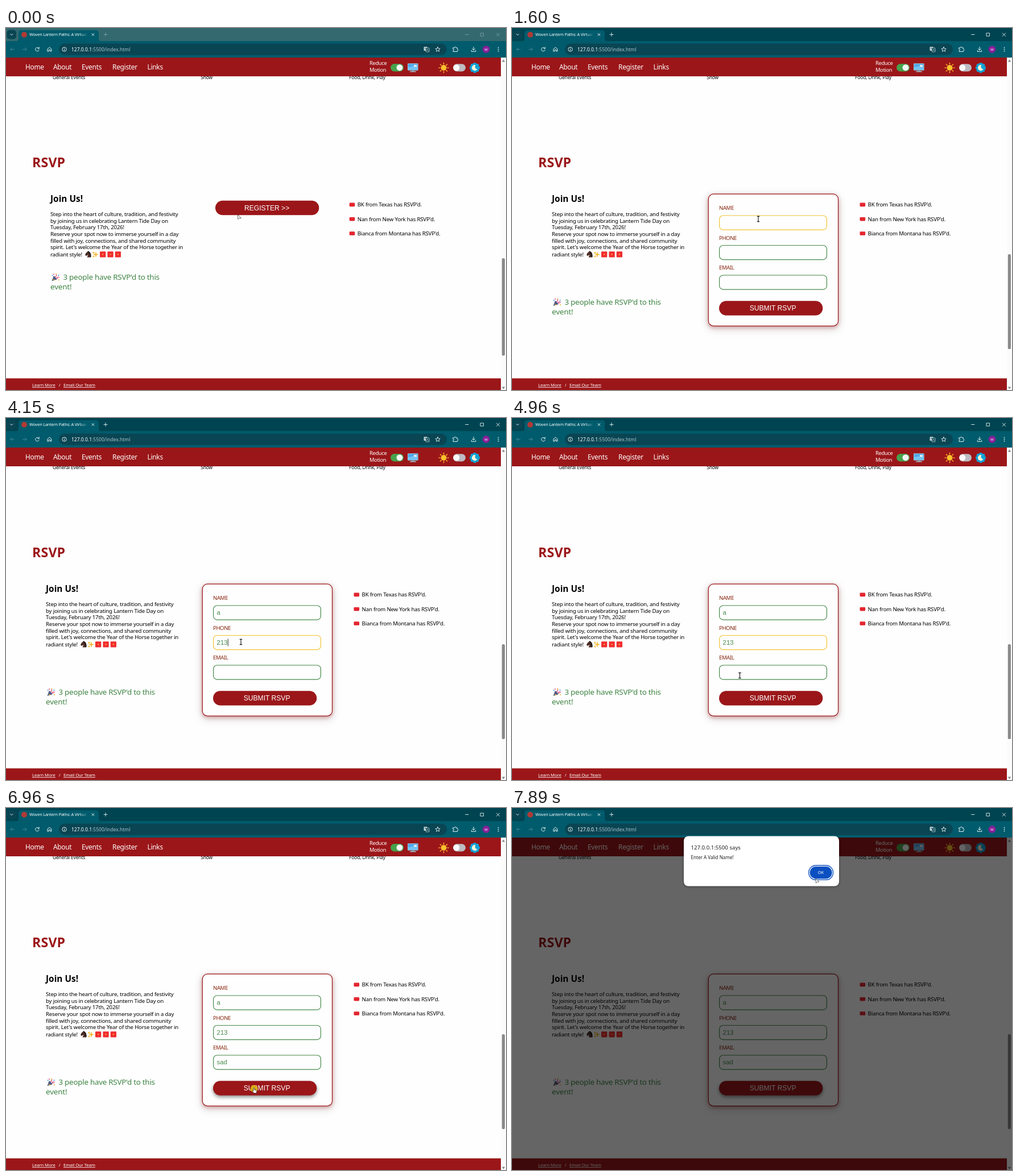
An HTML page that plays this animation: 879 px wide and 637 px high, repeating every 8000 ms.

```html
<!DOCTYPE html>
<html lang="en">
<head>
<meta charset="utf-8">
<title>RSVP form</title>
<style>
html, body { margin: 0; width: 100%; height: 100%; overflow: hidden; background: #fefefe; }
svg { display: block; width: 100%; height: 100%; }
text { font-family: "Noto Sans", "Open Sans", sans-serif; white-space: pre; }
.arial { font-family: "Liberation Sans", Arial, sans-serif; }
.card { filter: drop-shadow(0 2px 3px rgba(155, 22, 25, .32)) drop-shadow(0 4px 7px rgba(60, 10, 10, .2)); }
.hover { filter: drop-shadow(0 3px 3px rgba(0, 0, 0, .45)); }
</style>
</head>
<body>
<svg id="stage" viewBox="0 0 879 637" preserveAspectRatio="none"></svg>
<script>
const LOOP = 8000;
const RED = '#9b1619', GREEN = '#478a4b', GOLD = '#f2c335', TEAL = '#005b6c', DARK = '#0a4553';

const text = (x, y, str, size, fill = '#000', extra = '') =>
  `<text x="${x}" y="${y}" font-size="${size}" fill="${fill}" ${extra}>${str}</text>`;
const gap = n => `letter-spacing="${n}"`;
const rect = (x, y, w, h, r, fill, extra = '') =>
  `<rect x="${x}" y="${y}" width="${w}" height="${h}" rx="${r}" fill="${fill}" ${extra}/>`;
const circle = (x, y, r, fill, extra = '') =>
  `<circle cx="${x}" cy="${y}" r="${r}" fill="${fill}" ${extra}/>`;
const path = (d, fill, extra = '') => `<path d="${d}" fill="${fill}" ${extra}/>`;
const line = (d, color = '#e4f2f4', w = 1) =>
  path(d, 'none', `stroke="${color}" stroke-width="${w}" stroke-linecap="round" stroke-linejoin="round"`);
const group = (id, body) => `<g id="${id}">${body}</g>`;
const ring = (n, fn) => Array.from({ length: n }, (_, i) => fn(i * 2 * Math.PI / n)).join('');
const star = (x, y, r) => path(
  `M${x} ${y - r}Q${x} ${y} ${x + r} ${y}Q${x} ${y} ${x} ${y + r}Q${x} ${y} ${x - r} ${y}Q${x} ${y} ${x} ${y - r}`, '#f5b92e',
  'stroke="#f5b92e" stroke-width=".7"');

function browser() {
  return rect(0, 0, 879, 24, 0, '#004451', 'id="strip"') + rect(0, 23, 879, 29, 0, TEAL) +
    path('M17 23.5Q22 23.5 22 18.5V9Q22 4 27 4H158Q163 4 163 9V18.5Q163 23.5 168 23.5Z', TEAL) +
    rect(1.5, 3.5, 16.5, 16, 5, DARK) + line('M7.7 10.6L9.8 12.7L11.9 10.6') +
    circle(32, 11.7, 5, '#b03a36') +
    text(41, 14.3, 'Woven Lantern Paths: A Virtual', 7.3, 'url(#fade)', 'font-weight="500" ' + gap(-.15)) +
    line('M151 9.7L154.8 13.5M154.8 9.7L151 13.5') +
    group('controls', line('M172 11.5H178M175 8.5V14.5M807.5 11.5H813M834.3 9H839.5V14.2H834.3ZM862.3 9L867.7 14.4M867.7 9L862.3 14.4', '#e4f2f4', .9)) +
    line('M14.5 37.5H8M10.8 34.6L7.9 37.5L10.8 40.4M29.5 37.5H36M33.2 34.6L36.1 37.5L33.2 40.4', '#3f8593') +
    line('M57.6 35.6A3.3 3.3 0 1 0 58.1 38.6M58.2 33.8V36.2H55.8M73.2 36.8L76.5 34L79.8 36.8V41H77.8V38.4H75.2V41H73.2Z') +
    rect(93, 27.5, 682, 20, 10, DARK) +
    circle(102.5, 37.5, 3.7, 'none', 'stroke="#e4f2f4"') + line('M102.5 37.2V39.3M102.5 35.6V35.7') +
    text(115, 40.6, '127.0.0.1<tspan fill="#a9c3c9">:5500/index.html</tspan>', 8.5, '#fff') +
    rect(734.5, 33, 6, 7, 1, '#bdd2d6') + rect(738, 35, 6, 7, 1, DARK, 'stroke="#bdd2d6" stroke-width=".8"') +
    line('M736 35.3H739M737.5 34.5V36.5', '#587c85', .7) + line('M739.5 40L741 37L742.5 40', '#bdd2d6', .7) +
    line('M759 33.4L760.2 36.2L763.2 36.4L760.9 38.4L761.6 41.3L759 39.7L756.4 41.3L757.1 38.4L754.8 36.4L757.8 36.2Z', '#e4f2f4', .9) +
    line('M786 34.8H788.3A1.5 1.5 0 0 1 791.3 34.8H793.3V37A1.5 1.5 0 0 1 793.3 40V41.5H786V39.6A1.4 1.4 0 0 0 786 36.8Z') +
    line('M822 33.3V38.8M819.6 36.6L822 39L824.4 36.6M818.3 39.4V41.4H825.7V39.4') +
    circle(844, 37.5, 6.3, '#8b1f9c') + text(844, 39.7, 'W', 6, '#fff', 'text-anchor="middle"') +
    [34.3, 37.5, 40.7].map(y => circle(865.5, y, .9, '#e4f2f4')).join('');
}

function navbar() {
  const links = [[34, 'Home'], [83, 'About'], [133, 'Events'], [187, 'Register'], [248.5, 'Links']];
  return rect(0, 52, 870, 33, 0, RED) +
    links.map(([x, s]) => text(x, 73.4, s, 11.9, '#fff', gap(-.27))).join('') +
    text(639, 65.2, 'Reduce', 9.4, '#fff', gap(-.35)) + text(639, 76.6, 'Motion', 9.4, '#fff', gap(-.4)) +
    rect(676, 63, 23, 13.4, 6.7, '#46a24c') + circle(692, 69.7, 5.5, '#f6f6f6') +
    rect(706, 62.3, 18.6, 12.4, 1.2, '#9fc3d6') + rect(707, 63.3, 16.6, 10.2, .5, '#4fa9ea') +
    path('M707 69L723.6 66V73.5H707Z', '#74c3f3') +
    rect(717, 65, 5, 3.2, .3, '#e9eef0') + rect(713, 74.7, 5, 1.6, 0, '#76909e') + rect(710, 76.1, 11, 1.5, .7, '#a9bcc6') +
    ring(8, a => line(`M${769.5 + 6.6 * Math.cos(a)} ${70 + 6.6 * Math.sin(a)}L${769.5 + 8.4 * Math.cos(a)} ${70 + 8.4 * Math.sin(a)}`, '#f5a623', 1.7)) +
    circle(769.5, 70, 5, '#fbc02d') +
    rect(786, 63.2, 22, 13.2, 6.6, '#bcbcc2') + circle(791.8, 69.8, 5.5, '#fafafa') +
    ring(8, a => circle(824 + 6 * Math.cos(a), 70 + 6 * Math.sin(a), 3.1, '#12a3d6')) + circle(824, 70, 7.2, '#12a3d6') +
    path('M825.5 65.2A5 5 0 1 0 828.6 72.3A4.2 4.2 0 0 1 825.5 65.2Z', '#fff6d8');
}

function intro() {
  const lines = ['Step into the heart of culture, tradition, and festivity',
    'by joining us in celebrating Lantern Tide Day on', 'Tuesday, February 17th, 2026!',
    'Reserve your spot now to immerse yourself in a day', 'filled with joy, connections, and shared community',
    "spirit. Let's welcome the Year of the Horse together in"];
  const packet = x => rect(x, 393.3, 10.3, 10.2, 1, '#f02c2f') + rect(x + 4, 397.3, 2.3, 2.3, .5, '#f8a13a');
  return text(70, 306, 'Join Us!', 15.3, '#000', 'font-weight="700" ' + gap(.05)) +
    lines.map((s, i) => text(70, 331 + i * 11.63, s, 9.65, '#000', gap(-.17))).join('') +
    text(70, 401.9, 'radiant style!', 9.65, '#000', gap(-.17)) +
    path('M132.5 396L136 393L139 394.5Q141.5 397 141 403.5H134.5L136.5 399L133 401L131 399.5Z', '#4a2b23') +
    line('M136.5 393.2Q141 395 140.8 402.5', '#191413', 1.6) +
    star(150, 398.6, 4.4) + star(146, 395.5, 1.8) + star(146, 402, 1.6) +
    [157, 170.4, 183.7].map(packet).join('');
}

function counter() {
  const bits = [[76, 477, '#e8467c'], [80, 476.5, '#f3b52f'], [84.5, 479, '#3b9ae0'], [82.5, 484, '#e8467c'], [85, 487, '#f3b52f'], [73.6, 479.2, '#3b9ae0']];
  return path('M72.5 489L76 479.5L82 486Z', '#4a5a86') + path('M74 485L79 487.2L76.5 488Z', '#f3b52f') +
    line('M78.5 481.5Q81 480 80.6 477.5M80.5 483.5Q83 481 85.5 482.5', '#d6406f', 1.1) +
    bits.map(([x, y, c]) => circle(x, y, 1, c)).join('') +
    text(92.5, 486.7, "3 people have RSVP'd to this", 13.4, '#3f8444', gap(-.26)) +
    text(70, 503.6, 'event!', 13.4, '#3f8444', gap(-.15));
}

function guests() {
  return ['BK from Texas', 'Nan from New York', 'Bianca from Montana'].map((who, i) => {
    const y = 314.2 + i * 25.3;
    return rect(611.5, y - 6.6, 9.6, 6.6, 1.4, '#e2222c') + line(`M612.5 ${y - 5.4}L616.3 ${y - 3.4}L620.1 ${y - 5.4}`, '#ec4450', .5) +
      text(625.6, y, `${who} has RSVP'd.`, 9.65, '#000', gap(-.2));
  }).join('');
}

const button = (id, x, y, label) => rect(x, y, 182.3, 25.4, 12.7, RED, `id="${id}"`) +
  text(458.6, y + 17.1, label, 12.1, '#fff', 'class="arial" text-anchor="middle"');

function form() {
  return rect(345.3, 292.2, 228.2, 232.2, 9, '#fefefe', `class="card" stroke="${RED}" stroke-width="1.2"`) +
    ['NAME', 'PHONE', 'EMAIL'].map((s, i) => {
      const y = 320.4 + i * 52.5;
      return text(364, y, s, 9.6, '#87260f', gap(-.4)) +
        rect(364.6, y + 9.6, 188.8, 25.1, 6.5, '#fefefe', `id="box${i}" stroke-width="1.2"`) +
        text(370.6, y + 25.8, '', 11.3, GREEN, `id="value${i}" class="arial"`);
    }).join('') +
    rect(371, 0, .9, 13, 0, '#222', 'id="caret"') + button('submit', 364, 480.3, 'SUBMIT RSVP');
}

function dialog() {
  return rect(302, 49.5, 273, 88, 8, '#fff', 'style="filter:drop-shadow(0 1px 2px rgba(0,0,0,.4))"') +
    text(314.5, 72.8, '127.0.0.1:5500 says', 9.65, '#1f1f1f') +
    text(314.5, 90, 'Enter A Valid Name!', 8.1, '#1f1f1f') +
    rect(521.6, 101, 43, 25.4, 12.7, '#fff', 'stroke="#0b4fc0" stroke-width="1.3"') +
    rect(523.6, 103, 39, 21.4, 10.7, '#0b4fc0') +
    text(543, 116.4, 'OK', 7.6, '#fff', 'text-anchor="middle"');
}

const outline = 'stroke="#222" stroke-width=".65" stroke-linejoin="round"';
const stage = document.getElementById('stage');
stage.innerHTML = `<defs><linearGradient id="fade" gradientUnits="userSpaceOnUse" x1="130" x2="143" y1="0" y2="0">
  <stop stop-color="#fff"/><stop offset="1" stop-color="#fff" stop-opacity="0"/></linearGradient></defs>` +
  rect(0, 52, 879, 585, 0, '#fefefe') +
  [[82, 'General Events'], [342.3, 'Show'], [603, 'Food, Drink, Play']].map(([x, s]) => text(x, 90.2, s, 8.47, '#000', gap(-.17))).join('') +
  text(46, 244.8, 'RSVP', 23.2, RED, 'font-weight="700" ' + gap(.15)) +
  group('intro', intro()) + group('counter', counter()) + group('guests', guests()) +
  group('closed', button('register', 368, 303.8, 'REGISTER &gt;&gt;')) + group('open', form()) +
  rect(870, 52, 9, 585, 0, '#fbfbfb') + rect(871.8, 0, 5.2, 0, 2.6, '#8a8a8a', 'id="thumb"') +
  path('M871.8 59.5L874.5 55.5L877.2 59.5ZM871.8 631.5L874.5 635.5L877.2 631.5Z', '#858585') +
  navbar() + rect(0, 616.5, 870, 21, 0, RED) +
  text(46, 631, '<tspan text-decoration="underline">Learn More</tspan>', 7.7, '#fff', gap(-.08)) +
  text(92.8, 631, '/', 7.7, '#fff') +
  text(101, 631, '<tspan text-decoration="underline">Email Our Team</tspan>', 7.7, '#fff', gap(-.1)) +
  rect(0, 52, 879, 585, 0, '#000', 'id="dim" opacity=".6"') +
  browser() + group('dialog', dialog()) +
  group('pointer',
    circle(0, 1.5, 6.5, '#dcbc00', 'id="glow" opacity=".8"') +
    group('arrow', path('M0 0L.3 8L2.1 6.3L5.9 6Z', '#fff', outline)) +
    group('beam', line('M-1.8 -4.6H1.8M0 -4.6V4.6M-1.8 4.6H1.8', '#111', 1.1)) +
    group('hand', path('M-.9 .5Q0 -.6 .9 .5V3.6L4.2 4.4Q5 4.8 4.8 6L4 9.2H-.2L-2.6 5.8Q-2.4 4.6 -.9 5.6Z', '#fff', outline)));

const el = id => document.getElementById(id);
const show = (id, on) => el(id).setAttribute('display', on ? 'inline' : 'none');
const shift = (id, x, y) => el(id).setAttribute('transform', `translate(${x} ${y})`);
const set = (id, name, value) => el(id).setAttribute(name, value);
const latest = (track, t) => track.filter(k => k[0] <= t).pop();

// time, x, y, pointer shape
const moves = [
  [0, 407.5, 328.5, 'arrow'], [130, 411, 318, 'hand'], [400, 411, 318, 'arrow'], [530, 428, 325, 'arrow'],
  [660, 445, 334, 'beam'], [800, 438, 334, 'beam'], [930, 433, 336, 'beam'], [2140, 433, 336, ''],
  [2270, 426, 375, 'arrow'], [2410, 416, 389, 'beam'], [2540, 409.5, 397.5, 'beam'], [3750, 409, 397, ''],
  [4150, 413, 394, 'beam'], [4280, 417, 389, 'beam'], [4430, 420, 400, 'beam'], [4560, 424, 418, 'arrow'],
  [4690, 424, 440, 'beam'], [4830, 410, 447, 'beam'], [4960, 400.5, 453, 'beam'], [5500, 400, 453, ''],
  [5890, 431, 453, 'beam'], [6020, 438, 453, 'beam'], [6160, 438, 464, 'arrow'], [6290, 437, 482, 'hand'],
  [6420, 437, 490, 'hand'], [6560, 436, 492.5, 'hand'], [7360, 445, 460, 'arrow'], [7490, 473, 379, 'arrow'],
  [7630, 497, 270, 'arrow'], [7760, 521, 170, 'arrow'], [7890, 534, 124, 'arrow']];
const typing = [
  [[0, ''], [2140, 'a']],
  [[0, ''], [3750, '2'], [3880, '21'], [4010, '213']],
  [[0, ''], [5500, 's'], [5630, 'sa'], [5770, 'sad']]];
const focus = [[0, -1], [1070, 0], [2810, 1], [5100, 2], [6960, -1]];
const blink = [[0, 0], [1070, 1], [1600, 0], [2140, 1], [3210, 0], [3750, 1], [4430, 0], [4690, 1], [4960, 0], [5100, 1], [6820, 0]];
const clicks = [[270, 400], [1070, 1200], [5100, 5360], [6960, 7090]];

function draw(t) {
  const open = t >= 400, active = t >= 270, modal = t >= 7090;
  set('strip', 'fill', active ? '#004451' : '#33696f');
  set('controls', 'opacity', active ? 1 : .4);
  set('thumb', 'y', open ? 398 : 405);
  set('thumb', 'height', open ? 167 : 171.5);
  show('open', open);
  show('closed', !open);
  shift('intro', open ? 0 : 8, 0);
  shift('counter', open ? 0 : 8, open ? 0 : -43.7);
  shift('guests', open ? 0 : -7.8, 0);
  set('register', 'class', t >= 130 ? 'hover' : '');
  set('submit', 'class', t >= 6290 ? 'hover' : '');

  const field = latest(focus, t)[1];
  typing.forEach((track, i) => {
    const value = latest(track, t)[1];
    el('value' + i).textContent = value;
    set('box' + i, 'stroke', i === field ? GOLD : GREEN);
    if (i === field) {
      set('caret', 'x', 371 + (value ? el('value' + i).getComputedTextLength() : 0));
      set('caret', 'y', 336 + i * 52.5);
    }
  });
  show('caret', field >= 0 && latest(blink, t)[1]);

  show('dim', modal);
  show('dialog', modal);
  const settled = t >= 7230;
  set('dialog', 'opacity', settled ? 1 : .6);
  shift('dialog', 0, settled ? 0 : -6);

  const [, x, y, shape] = latest(moves, t);
  shift('pointer', x, y);
  ['arrow', 'beam', 'hand'].forEach(id => show(id, id === shape));
  show('glow', clicks.some(([a, b]) => t >= a && t < b));
}

const start = performance.now();
function tick() {
  draw((performance.now() - start) % LOOP);
  requestAnimationFrame(tick);
}
draw(0);
requestAnimationFrame(tick);
</script>
</body>
</html>
```
